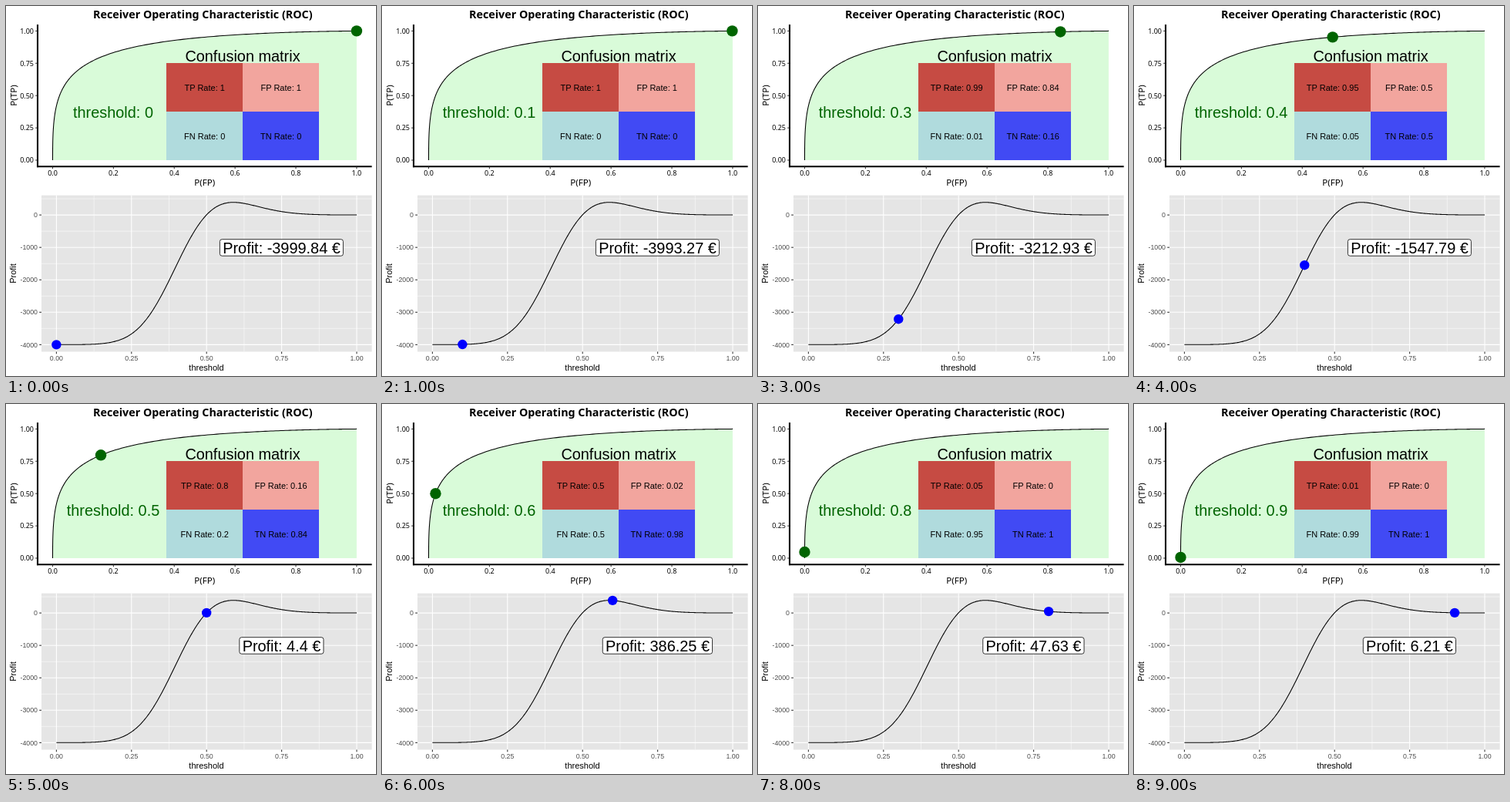
An HTML page that plays this animation: 480x480 px, repeating every 10 s.

```html
<!DOCTYPE html>
<html lang="en">
<head>
<meta charset="utf-8">
<title>ROC curve and profit</title>
<style>
  html, body { margin: 0; width: 100%; height: 100%; overflow: hidden; background: #fff; }
  svg { display: block; width: 100vw; height: 100vh; }
  text { font-family: "Liberation Sans", Arial, sans-serif; font-size: 11px; text-anchor: middle; }
  .human, .human-tick, .title { font-family: "Noto Sans", "Open Sans", sans-serif; }
  .human { font-size: 11.6px; }
  .human-tick { font-size: 9px; }
  .title { font-size: 14.3px; font-weight: 700; }
  .tick { font-size: 8.8px; fill: #4d4d4d; }
  .end { text-anchor: end; }
  .big { font-size: 19.9px; }
  .green { fill: #006400; }
  .curve { fill: none; stroke: #000; stroke-width: 1.07; stroke-linejoin: round; }
</style>
</head>
<body>
<svg id="stage" viewBox="0 0 480 480"></svg>
<script>
const stage = document.getElementById('stage');
const STEP_MS = 1000, STEPS = 10;

function add(tag, attrs, content = '') {
  const el = document.createElementNS('http://www.w3.org/2000/svg', tag);
  for (const key in attrs) el.setAttribute(key, attrs[key]);
  el.textContent = content;
  return stage.appendChild(el);
}
const text = (x, y, content, cls = '', extra = {}) => add('text', { x, y, class: cls, ...extra }, content);
const line = (x1, y1, x2, y2, stroke, width) =>
  add('line', { x1, y1, x2, y2, stroke, 'stroke-width': width });
const rect = (x, y, width, height, fill) => add('rect', { x, y, width, height, fill });
const sideways = (x, y, content, cls) => text(x, y, content, cls, { transform: `rotate(-90 ${x} ${y})` });

// Normal distribution function as a power series.
function normalCdf(z) {
  let term = z, sum = z;
  for (let k = 3; k < 220; k += 2) sum += term *= z * z / k;
  return 0.5 + sum * Math.exp(-z * z / 2) / Math.sqrt(2 * Math.PI);
}
const tpRate = t => normalCdf((0.6 - t) / 0.12);
const fpRate = t => normalCdf((0.4 - t) / 0.1);
const profit = t => 1000 * tpRate(t) - 5000 * fpRate(t);
const round2 = v => String(Math.abs(Number(v.toFixed(2))) && Number(v.toFixed(2)));

const rocX = v => 60.5 + 394.4 * v;
const rocY = v => 200 - 167.6 * v;
const gainX = t => 65.4 + 389.6 * t;
const gainY = v => 271.1 - 0.04206 * v;

function curvePoints(x, y) {
  const points = [];
  for (let i = 0; i <= 400; i++) points.push(`${x(i / 400).toFixed(2)},${y(i / 400).toFixed(2)}`);
  return points.join(' ');
}

// Upper chart
text(255.3, 16, 'Receiver Operating Characteristic (ROC)', 'title');
const roc = curvePoints(t => rocX(fpRate(t)), t => rocY(tpRate(t)));
add('polygon', { points: `${rocX(1)},200 ${roc} ${rocX(0)},200`, fill: '#d9fbd9' });
add('polyline', { points: roc, class: 'curve' });
line(41, 24, 41, 209.2, '#000', 2.1);
line(40, 208.3, 474.6, 208.3, '#000', 2.1);
for (let i = 0; i <= 4; i++) {
  const y = rocY(i / 4);
  line(38.2, y, 41, y, '#333', 1.07);
  text(36, y + 3.3, (i / 4).toFixed(2), 'human-tick end');
}
for (let i = 0; i <= 5; i++) {
  const x = rocX(i / 5);
  line(x, 208.3, x, 211.2, '#333', 1.07);
  text(x, 220, (i / 5).toFixed(1), 'human-tick');
}
text(257.7, 233, 'P(FP)', 'human');
sideways(13.5, 116, 'P(TP)', 'human');

text(307, 72, 'Confusion matrix', 'big');
const cells = [
  ['TP', 208, 74, '#c64b43', tpRate],
  ['FP', 307, 74, '#f2a59e', fpRate],
  ['FN', 208, 137, '#b0dbdd', t => 1 - tpRate(t)],
  ['TN', 307, 137, '#414af4', t => 1 - fpRate(t)],
].map(([name, x, y, fill, rate]) => {
  rect(x, y, 99, 63, fill);
  return { name, rate, label: text(x + 49.7, y + 36, '') };
});
const thresholdLabel = text(139, 145, '', 'big green');
const rocDot = add('circle', { r: 7.2, class: 'green' });

// Lower chart
rect(46, 245.6, 428.6, 202.9, '#e5e5e5');
for (let i = 0; i <= 8; i++) {
  const x = gainX(i / 8), y = gainY(500 - 500 * i), width = i % 2 ? 0.53 : 1.07;
  line(x, 245.6, x, 448.5, '#fff', width);
  line(46, y, 474.6, y, '#fff', i % 2 ? 1.07 : 0.53);
}
line(46, gainY(-4000), 474.6, gainY(-4000), '#fff', 1.07);
for (let i = 0; i <= 4; i++) {
  const x = gainX(i / 4), y = gainY(-1000 * i);
  line(x, 448.5, x, 451.3, '#333', 1.07);
  line(43.2, y, 46, y, '#333', 1.07);
  text(x, 460, (i / 4).toFixed(2), 'tick');
  text(41, y + 3.2, i ? String(-1000 * i) : '0', 'tick end');
}
text(260, 473, 'threshold');
sideways(13, 347, 'Profit');
add('polyline', { points: curvePoints(gainX, t => gainY(profit(t))), class: 'curve' });
const gainDot = add('circle', { r: 6.2, fill: '#00f' });
const profitBox = add('rect', {
  y: 302.7, height: 21.5, rx: 2.8, fill: '#fff', stroke: '#000', 'stroke-width': 0.8
});
const profitLabel = text(357.5, 320.8, '', 'big');

function show(t) {
  for (const { name, rate, label } of cells) label.textContent = `${name} Rate: ${round2(rate(t))}`;
  thresholdLabel.textContent = `threshold: ${t}`;
  rocDot.setAttribute('cx', rocX(fpRate(t)));
  rocDot.setAttribute('cy', rocY(tpRate(t)));
  gainDot.setAttribute('cx', gainX(t));
  gainDot.setAttribute('cy', gainY(profit(t)));
  profitLabel.textContent = `Profit: ${round2(profit(t))} €`;
  const width = profitLabel.getComputedTextLength() + 7.4;
  profitBox.setAttribute('x', 357.4 - width / 2);
  profitBox.setAttribute('width', width);
}

const start = performance.now();
let shown = -1;
function tick() {
  const step = Math.floor((performance.now() - start) / STEP_MS) % STEPS;
  if (step !== shown) show((shown = step) / STEPS);
  requestAnimationFrame(tick);
}
tick();
</script>
</body>
</html>
```
